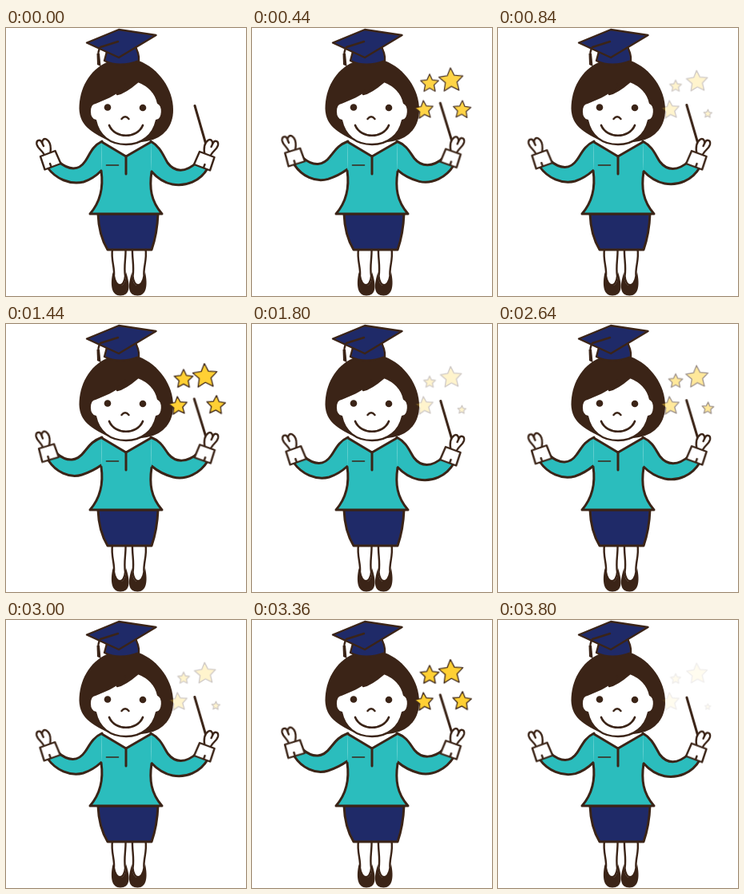
These frames come from a looping animation (300x336 px, 3840 ms). An HTML page:

```html
<!DOCTYPE html>
<html lang="en">
<head>
<meta charset="utf-8">
<title>Teacher with star wand</title>
<style>
  html, body { margin: 0; width: 100%; height: 100%; overflow: hidden; background: #fff; }
  svg { display: block; width: 300px; height: 336px; }

  .line { fill: none; stroke: #3b2417; stroke-width: 3; stroke-linecap: round; stroke-linejoin: round; }
  .fine { stroke-width: 2.4; }
  .white { fill: #fff; }
  .teal { fill: #2bbdbd; }
  .navy { fill: #1f2a68; }
  .dark { fill: #3b2417; }

  /* Each half cycle advances in twelve 40 ms steps. */
  .star, .sleeve, .hand { animation: 960ms steps(12, end) infinite; }
  .star { animation-name: glow; }
  .hand { animation-name: lift; }
  .left.hand { transform-origin: 55px 166px; --lift: translate(-2.3px, -4px) rotate(4deg); }
  .right.hand { transform-origin: 249px 167px; --lift: translate(.5px, -3.8px) rotate(-1deg); }
  .left.sleeve { animation-name: bend-left; }
  .right.sleeve { animation-name: bend-right; }

  @keyframes glow {
    0%, 100% { opacity: 0; transform: scale(var(--s)); }
    50% { opacity: 1; transform: scale(1); }
  }
  @keyframes lift {
    0%, 100% { transform: translate(0px, 0px) rotate(0deg); }
    50% { transform: var(--lift); }
  }
  @keyframes bend-left {
    0%, 100% { d: path("M120 142 C108 148 105 158 99 167 C91 179 79 179 65 167 L52 175 C62 189 80 197 97 193 C106 190 113 185 119 179"); }
    50% { d: path("M120 142 C107 147 104 153 98 160 C89 172 77 174 63 162 L53 171 C62 185 79 194 95 189 C104 186 112 182 119 177"); }
  }
  @keyframes bend-right {
    0%, 100% { d: path("M181 142 C193 149 196 159 202 169 C211 181 224 182 239 168 L252 176 C243 192 225 199 208 196 C197 194 189 188 182 180"); }
    50% { d: path("M181 142 C194 147 197 155 203 163 C212 174 226 174 240 162 L252 172 C243 187 225 196 209 192 C198 189 190 185 182 178"); }
  }
</style>
</head>
<body>
<svg viewBox="0 0 300 336">
  <defs>
    <g id="hand" class="line white">
      <path class="fine" d="M49 162 C47 154 40 152 38.500 146 C37.500 140 43 139 45 144 L47 148 C43 142 47 138 50.500 139.500 C56 143 57 149 55 159"/>
      <path class="fine" d="M43 161 L61.500 154 L68.500 170 L48.500 177.500 Z"/>
      <path class="fine" d="M55 170 L56.500 174"/>
    </g>
    <path id="star" fill="#ffd034" stroke="#3b2417" stroke-width="1.3" stroke-linejoin="round" vector-effect="non-scaling-stroke"
      d="M0 -10 L2.8 -3.9 L9.5 -3.1 L4.6 1.5 L5.9 8.1 L0 4.8 L-5.9 8.1 L-4.6 1.5 L-9.5 -3.1 L-2.8 -3.9 Z"/>
    <g id="leg">
      <path class="line fine white" d="M133 277 C131 291 136 299 135 311 C137 326 148 326 149 311 C147 299 150 289 149.500 277"/>
      <path class="dark" d="M133.500 306 C130 323 132 335.500 143 335.500 C155 335.500 156 324 150 306 C150 318 147 323 143 323 C139 323 136 318 133.500 306 Z"/>
    </g>
  </defs>

  <!-- legs and skirt -->
  <use href="#leg"/>
  <use href="#leg" transform="matrix(-1 0 0 1 307.500 0)"/>
  <path class="line navy" d="M115 233 H190 Q189 258 182 278 H127 Q116 260 115 233 Z"/>

  <!-- arms -->
  <path class="line teal left sleeve" d="M120 142 C108 148 105 158 99 167 C91 179 79 179 65 167 L52 175 C62 189 80 197 97 193 C106 190 113 185 119 179"/>
  <path class="line teal right sleeve" d="M181 142 C193 149 196 159 202 169 C211 181 224 182 239 168 L252 176 C243 192 225 199 208 196 C197 194 189 188 182 180"/>
  <g class="left hand"><use href="#hand"/></g>
  <g class="right hand">
    <path class="line" d="M236 97.500 L250 146"/>
    <use href="#hand" transform="matrix(-1 0 0 1 303.500 1)"/>
  </g>

  <!-- top -->
  <path class="teal" d="M120 143 L150 161 L181 143 L182 180 C179 200 181 217 195 233 H105 C118 218 122 200 119 179 Z"/>
  <path class="line" d="M119 179 C122 200 118 218 105 233 H195 C181 217 179 200 182 180"/>
  <path class="line white" d="M120 143 L150 161 L181 143"/>
  <path class="line" d="M150 161 V183"/>
  <path class="line" style="stroke-width:1.6" d="M125.500 172 H140.500"/>

  <!-- head -->
  <path class="dark" d="M126 43 C104 53 91.500 76 91.500 101 C92 118 101 129 128 141 L150 146 L176 142 C198 138 209 122 209 103 C209 76 191 51 166 41 Z"/>
  <path class="line fine white" d="M111 94 C103 94 102 115 112 116 C116 135 130 146 150 146 C170 146 184 134 188 116 C197 115 197 96 190 94 C187 81 178 72 165 67 C158 73 149 81 139 83 C143 80 147 76 149 71 C139 83 126 88 111 94 Z"/>
  <circle class="dark" cx="127" cy="99.500" r="4.300"/>
  <circle class="dark" cx="171" cy="100" r="4.300"/>
  <path class="line fine" d="M144.500 114 Q149 108.500 153.500 114"/>
  <path class="line" style="stroke-width:2.700" d="M129 122 C136 139 164 139 171 122"/>

  <!-- cap -->
  <path class="line navy fine" d="M127 26 L123 41 Q142 50.500 166 41 Q167 32 160 20 Z"/>
  <path class="line navy fine" d="M101 18.500 L141 2 L187.500 9 L141 37 Z"/>
  <path class="line fine" d="M140 17 L118 24 Q114 29 116 40"/>
  <path class="dark" d="M113.500 32 L117 32 L118.500 48 L114 46 Z"/>

  <!-- stars, each growing upward from its base -->
  <g transform="translate(249.500 78.500)"><g class="star" style="--s:.83"><use href="#star" transform="rotate(-3) scale(1.600) translate(0 -8.100)"/></g></g>
  <g transform="translate(222 79.300)"><g class="star" style="--s:.5"><use href="#star" transform="scale(1.240) translate(0 -8.100)"/></g></g>
  <g transform="translate(216 112.500)"><g class="star" style="--s:1"><use href="#star" transform="rotate(-5) scale(1.200) translate(0 -8.100)"/></g></g>
  <g transform="translate(262 112)"><g class="star" style="--s:.25"><use href="#star" transform="rotate(3) scale(1.240) translate(0 -8.100)"/></g></g>
</svg>
</body>
</html>
```
